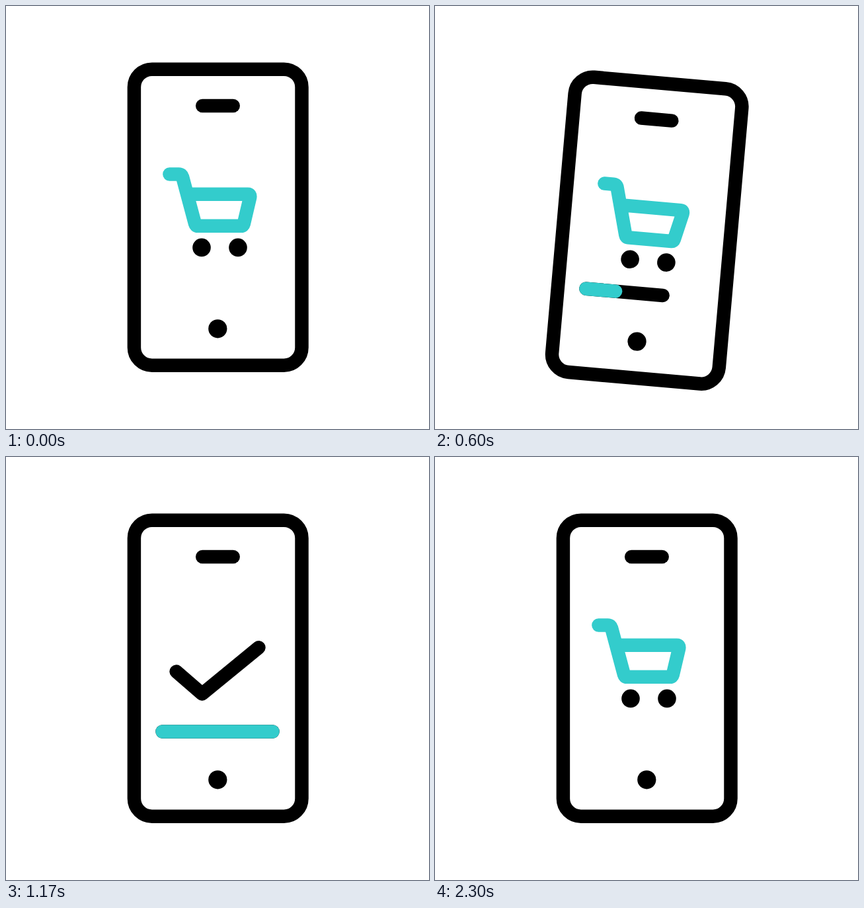
Animation of 640 by 640 pixels, one loop 2500 ms. Source, as an HTML page:

```html
<!DOCTYPE html>
<html lang="en">
<head>
<meta charset="utf-8">
<title>Mobile checkout</title>
<style>
  html, body { margin: 0; width: 100%; height: 100%; overflow: hidden; background: #fff; }
  svg { display: block; width: 100%; height: 100%; }
  .line { fill: none; stroke: #000; stroke-width: 20.5; stroke-linecap: round; stroke-linejoin: round; }
  .teal { stroke: #3cc; }
</style>
</head>
<body>
<svg viewBox="0 0 640 640">
  <clipPath id="screen"><rect x="193.9" y="95.7" width="253.6" height="448" rx="27"/></clipPath>
  <g id="phone">
    <g clip-path="url(#screen)">
      <g id="cart">
        <path class="line teal" d="M247.4 254.5H261.5Q266 254.5 267.2 259.3L286 329.3Q287 332.8 290 332.8H356Q359 332.8 359.8 329.5L369.2 289.6Q370 284.8 366 284.8H275"/>
        <circle cx="296" cy="365.4" r="13.8"/>
        <circle cx="351" cy="365.4" r="13.8"/>
      </g>
    </g>
    <path id="track" class="line" pathLength="1" d="M236.5 415.5H403.5"/>
    <path id="fill" class="line teal" pathLength="1" d="M236.5 415.5H403.5"/>
    <path id="check" class="line" pathLength="1" d="M257.6 324.6L296.8 358.4L382.4 288.2"/>
    <rect class="line" x="193.9" y="95.7" width="253.6" height="448" rx="27"/>
    <path class="line" d="M297.2 151H343.7"/>
    <circle cx="320.3" cy="488.3" r="14.1"/>
  </g>
</svg>
<script>
const [phone, cart, track, fill, check] =
  ['phone', 'cart', 'track', 'fill', 'check'].map(id => document.getElementById(id));

const LOOP = 2500, FPS = 30;

// Eased value through [tick, value] keys, with ticks at 30 per second.
function tween(tick, keys) {
  let [start, value] = keys[0];
  for (const [end, next] of keys.slice(1)) {
    if (tick <= start) break;
    const s = Math.min(1, (tick - start) / (end - start));
    value += (next - value) * s * s * (3 - 2 * s);
    start = end;
  }
  return value;
}

// Show only the part of a path between two fractions of its length.
function trim(path, from, to) {
  const shown = to - from;
  path.style.visibility = shown > 0.0005 ? 'visible' : 'hidden';
  path.style.strokeDasharray = `${Math.max(shown, 0)} 2`;
  path.style.strokeDashoffset = -from;
}

function draw(ms) {
  // Motion is stepped at 30 frames per second.
  const tick = Math.floor((ms + 3.4) * FPS / 1000) + 0.05;

  const lift = tween(tick, [[5, 0], [12.5, -30], [20, 30], [27.5, 0]]);
  const tilt = tween(tick, [[5, 0], [12.5, -4.8], [20, 7], [27.5, 0]]);
  phone.setAttribute('transform', `translate(0 ${lift}) rotate(${tilt} 320.5 319.7)`);

  const slide = tick < 45
    ? tween(tick, [[7.5, 0], [15, -27], [30, 253]])
    : tween(tick, [[55.5, -240], [69, 0]]);
  cart.setAttribute('transform', `translate(${slide} 0)`);

  const barStart = tween(tick, [[52.4, 0], [66.9, 1]]);
  trim(track, barStart, tween(tick, [[7.5, 0], [24.1, 1]]));
  trim(fill, barStart, tween(tick, [[7.5, 0], [15, 0.14], [27.5, 1]]));
  trim(check, tween(tick, [[51.3, 0], [59.7, 1]]), tween(tick, [[25, 0], [35, 1]]));
}

const began = performance.now();
function loop() {
  draw((performance.now() - began) % LOOP);
  requestAnimationFrame(loop);
}
loop();
</script>
</body>
</html>
```
